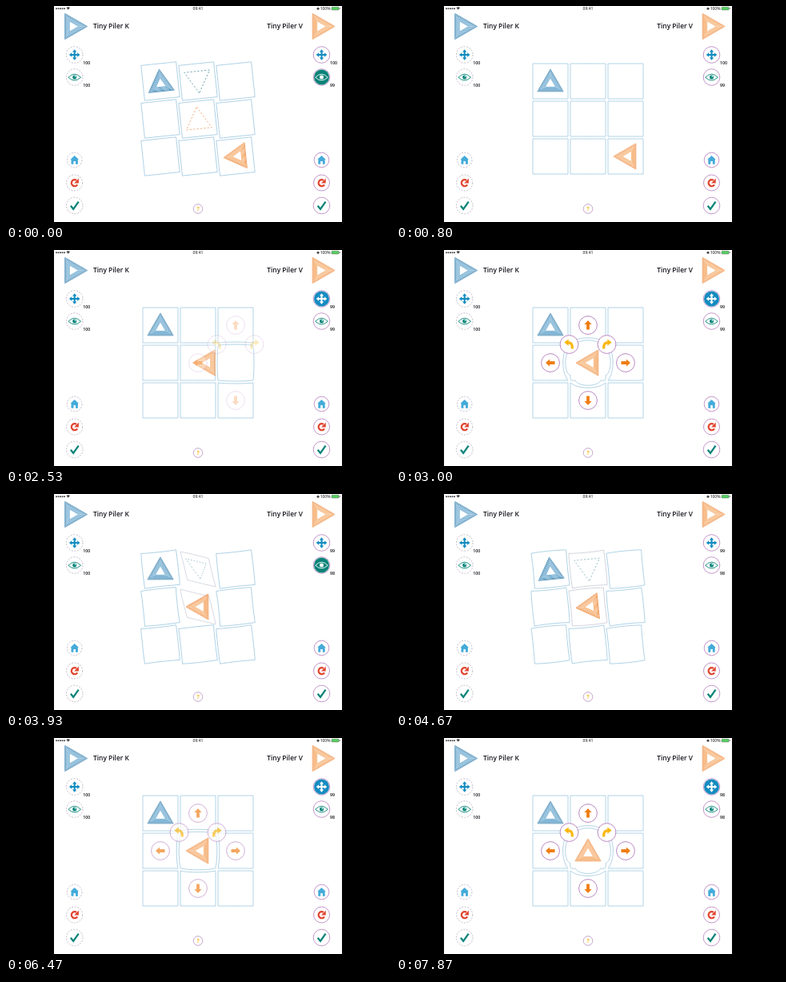
An HTML page for the animation above (8000 ms loop, 480 by 270 pixels).

```html
<!DOCTYPE html>
<html lang="en">
<head>
<meta charset="utf-8">
<title>Triangle board game</title>
<style>
html, body { margin: 0; width: 100%; height: 100%; overflow: hidden; background: #000; }
svg { display: block; width: 480px; height: 270px; }
text { font-family: "Open Sans", sans-serif; fill: #15151c; }
.name { font-size: 8.4px; font-weight: 600; }
.count { font-size: 5.3px; font-weight: 600; }
.bar { font-size: 5px; font-weight: 600; fill: #444; }
.hint { font-size: 7.5px; font-weight: 700; fill: #f5b51c; }
</style>
</head>
<body>
<svg id="stage" viewBox="0 0 480 270">
  <defs>
    <g id="move">
      <path d="M0-4V4M-4 0H4" stroke="currentColor" stroke-width="2.1"/>
      <path d="M0-6.8L2.7-3.4H-2.7ZM0 6.8L2.7 3.4H-2.7ZM-6.8 0L-3.4-2.7V2.7ZM6.8 0L3.4-2.7V2.7Z" fill="currentColor"/>
    </g>
    <g id="eye">
      <path d="M-7.8 .3Q0-8 7.8 .3Q0 7.5-7.8 .3Z" fill="none" stroke="currentColor" stroke-width=".9"/>
      <circle r="2.5" fill="currentColor"/>
      <circle cx=".9" cy="-.9" r=".9" fill="#dff"/>
    </g>
    <path id="home" d="M0-5.6L5.2-.8H4.2V5.2H1.3V1.4H-1.3V5.2H-4.2V-.8H-5.2Z" fill="#45abd9"/>
    <g id="undo">
      <path d="M2.4-3.2A4 4 0 1 0 3.5 2.4" fill="none" stroke="#e0452f" stroke-width="2.3"/>
      <path d="M5.2-5.4V.4H-.4Z" fill="#e0452f"/>
    </g>
    <path id="check" d="M-4.8 .3L-1.5 4.4L5-4.8" fill="none" stroke="#078378" stroke-width="2.3"/>
    <path id="arrow" d="M0-6L4.6-1H1.9V5.5H-1.9V-1H-4.6Z" fill="#f07d14"/>
    <g id="turn">
      <path d="M-3.6 5.6C-4.4 0-2.4-2.3 1.6-2.4" fill="none" stroke="#fbb60c" stroke-width="3.2"/>
      <path d="M.8-6.6L6.2-2.4L.8 1.8Z" fill="#fbb60c"/>
    </g>
  </defs>
  <rect width="480" height="270" fill="#000"/>
  <rect x="60" width="360" height="270" fill="#fff"/>
  <g fill="#444">
    <path d="M63 3.2H74" stroke="#444" stroke-width="2" stroke-linecap="round" stroke-dasharray="0 2.5"/>
    <path d="M75.4 2.1Q77.7 .2 80 2.1L77.7 4.8Z"/>
    <circle cx="390" cy="3.2" r="1.5"/>
    <rect x="407" y="1.2" width="9" height="3.8" rx=".6" fill="#55cf62" stroke="#555" stroke-width=".4"/>
    <rect x="416.6" y="2.2" width=".9" height="1.8"/>
  </g>
  <text class="bar" x="240" y="5" text-anchor="middle">09:41</text>
  <text class="bar" x="405.5" y="5" text-anchor="end">100%</text>
  <text class="name" x="109" y="28.3">Tiny Piler K</text>
  <text class="name" x="371" y="28.3" text-anchor="end">Tiny Piler V</text>
  <circle cx="240" cy="253.5" r="5.8" fill="#fff" stroke="#b98fc0" stroke-width=".8"/>
  <text class="hint" x="240" y="256.3" text-anchor="middle">?</text>
</svg>
<script>
const LOOP = 8000, PITCH = 47, PURPLE = '#b47cbb', SKY = '#a9cfe4';
const BLUE = ['#3f86b3', '#5a9fc9'], ORANGE = ['#f0924a', '#f5a763'];
const DIRS = [[0, -1], [1, 0], [0, 1], [-1, 0]];
const stage = document.getElementById('stage');

const clamp = v => Math.max(0, Math.min(1, v));
const ramp = (t, from, to) => clamp((t - from) / (to - from));
const smooth = u => (1 - Math.cos(Math.PI * u)) / 2;
const within = (t, spans) => spans.some(([a, b]) => t >= a && t < b);
const center = (c, r) => [193 + PITCH * c, 94 + PITCH * r];

function set(el, attrs) {
  for (const k in attrs) el.setAttribute(k, attrs[k]);
  return el;
}
function add(parent, tag, attrs = {}) {
  return parent.appendChild(set(document.createElementNS('http://www.w3.org/2000/svg', tag), attrs));
}
const at = (x, y, rest = '') => ({ transform: `translate(${x} ${y}) ${rest}` });

// Nested triangles pointing up
function piece(parent, [dark, light]) {
  const g = add(parent, 'g', { fill: 'none' });
  for (let i = 0; i < 6; i++) {
    const k = 1 - i * .115;
    const y = v => 3.3 + (v - 3.3) * k;
    add(g, 'path', {
      d: `M0 ${y(-15)}L${16 * k} ${y(12.8)}H${-16 * k}Z`,
      stroke: i < 2 ? dark : light, 'stroke-width': .8
    });
  }
  return g;
}

function button(x, y, icon, color, r, dashed) {
  const g = add(stage, 'g', at(x, y));
  add(g, 'circle', {
    r, fill: '#fff', stroke: dashed ? '#b5a9bd' : PURPLE,
    'stroke-width': .8, 'stroke-dasharray': dashed ? '2 1.6' : 'none'
  });
  const disc = add(g, 'circle', { r: r - .8, fill: color, opacity: 0 });
  const mark = add(g, 'use', { href: '#' + icon, color });
  return on => {
    set(disc, { opacity: on ? 1 : 0 });
    set(mark, { color: on ? '#fff' : color });
  };
}
function counter(x, y) {
  const el = add(stage, 'text', { x, y, class: 'count' });
  el.textContent = '100';
  return el;
}

function panel(x, dashed) {
  const move = button(x, 61, 'move', '#148cc0', 10.3, dashed);
  const eye = button(x, 89, 'eye', '#078378', 10.3, dashed);
  button(x, 192.5, 'home', '#45abd9', 9.3, dashed);
  button(x, 221, 'undo', '#e0452f', 10, dashed);
  button(x, 249.5, 'check', '#078378', 10.3, dashed);
  return { move, eye, moves: counter(x + 10.5, 73), looks: counter(x + 10.5, 101) };
}
panel(85.7, true);
const right = panel(394.5, false);

set(piece(stage, BLUE), at(86.5, 25.5, 'rotate(90)'));
set(piece(stage, ORANGE), at(396, 25.5, 'rotate(90)'));

const cells = [];
for (let r = 0; r < 3; r++) for (let c = 0; c < 3; c++) {
  const g = add(stage, 'g');
  cells.push({ c, r, g, path: add(g, 'path', { fill: 'none', stroke: SKY, 'stroke-width': .9 }) });
}
function hide(cell, color) {
  cell.back = add(cell.g, 'path', {
    d: 'M0-15L16 12.5H-16Z', fill: 'none', stroke: color,
    'stroke-width': .75, 'stroke-dasharray': '2.2 2.2'
  });
}
hide(cells[1], '#4d8f9c');
hide(cells[4], '#f09a5c');

const blue = piece(stage, BLUE), orange = piece(stage, ORANGE);

// Column, row, opening time, closing time
const menus = [
  [2, 2, 1130, 1500], [2, 1, 1700, 2230], [1, 1, 2600, 3470],
  [1, 1, 5270, 6270], [1, 1, 6880, 9000]
].map(([c, r, open, close]) => {
  const [x, y] = center(c, r);
  const g = add(stage, 'g');
  const items = [];
  const put = (dx, dy, icon, rest) => {
    const b = add(g, 'g');
    add(b, 'circle', { r: 11.4, fill: '#fff', stroke: PURPLE, 'stroke-width': .9 });
    add(b, 'use', { href: '#' + icon, transform: rest });
    items.push([b, x + dx, y + dy]);
  };
  DIRS.forEach(([dx, dy], i) => {
    if (cells.some(k => k.c === c + dx && k.r === r + dy))
      put(dx * PITCH, dy * PITCH, 'arrow', `rotate(${i * 90})`);
  });
  put(-23.5, -23, 'turn', 'scale(-1 1)');
  put(23.5, -23, 'turn', '');
  return { c, r, open, close, g, items };
});

// Tilt of the board, later tilt of the contents, card flip, ripple of the sides
function eyeState(t) {
  if (t < 270) return { tilt: 1, late: 1, flip: 1, wave: 0 };
  if (t >= 3600 && t < 4600) {
    const x = t - 3600;
    return {
      tilt: 1 - Math.exp(-x / 110) * Math.cos(x / 90),
      late: smooth(ramp(x, 280, 700)),
      flip: smooth(clamp(x / 520)),
      wave: 3 * Math.exp(-x / 220) * Math.sin(x / 80)
    };
  }
  const start = t < 3600 ? 270 : 4600;
  const u = ramp(t, start, start + 530), left = 1 - smooth(u);
  return { tilt: left, late: left, flip: left, wave: 2 * Math.sin(u * 9) * (1 - u) * Math.min(1, u * 4) };
}

function bulgeAt(m, t) {
  if (t < m.open) return 0;
  const grow = 1 - Math.exp((m.open - t) / 110);
  return 6.4 * grow * (t > m.close ? Math.exp((m.close - t) / 160) : 1);
}

// Square whose four sides bow outwards by the given amounts
function cellPath(bows) {
  const [t, r, b, l] = bows.map(v => 22 + v * 4 / 3);
  const k = Math.max(0, Math.min(...bows)), e = 22 - k, q = 22 + k * .3;
  return `M${-e}-22C-12 ${-t} 12 ${-t} ${e}-22Q${q} ${-q} 22 ${-e}` +
    `C${r}-12 ${r} 12 22 ${e}Q${q} ${q} ${e} 22` +
    `C12 ${b}-12 ${b} ${-e} 22Q${-q} ${q}-22 ${e}` +
    `C${-l} 12 ${-l}-12-22 ${-e}Q${-q} ${-q} ${-e}-22Z`;
}

function draw(t) {
  const eye = eyeState(t), tilt = -6 * eye.tilt, late = -6 * eye.late;

  const bows = cells.map((_, i) => DIRS.map((_, d) => eye.wave * (d % 2 ? -.6 : 1) * (i % 2 ? -1 : 1)));
  for (const m of menus) {
    const b = bulgeAt(m, t);
    if (b) DIRS.forEach(([dx, dy], d) => {
      const c = m.c + dx, r = m.r + dy;
      bows[m.r * 3 + m.c][d] += b;
      if (c >= 0 && c < 3 && r >= 0 && r < 3) bows[r * 3 + c][(d + 2) % 4] -= b;
    });
    const k = ramp(t, m.open + 60, m.open + 280);
    const fade = clamp((t - m.close) / 350);
    set(m.g, { opacity: Math.min(1, k * 1.2) * (1 - fade * fade) });
    m.items.forEach(([el, x, y]) => set(el, at(x, y, `scale(${k})`)));
  }

  const turning = eye.flip > .01 && eye.flip < .99;
  cells.forEach((cell, i) => {
    let spin = `rotate(${tilt})`;
    if (cell.back) {
      const s = Math.abs(Math.cos(Math.PI * eye.flip));
      spin = `rotate(${late}) rotate(45) scale(1 ${s}) rotate(-45)`;
      set(cell.path, { stroke: turning ? '#ced1da' : SKY });
      set(cell.back, { opacity: eye.flip > .5 ? (turning ? .7 : 1) : 0 });
    }
    set(cell.path, { d: cellPath(bows[i]) });
    set(cell.g, at(...center(cell.c, cell.r), spin));
  });
  set(cells[1].back, { transform: 'rotate(180)' });
  set(cells[4].back, { transform: `rotate(${t < 1000 ? 0 : -90})` });

  const row = 2 - smooth(ramp(t, 1560, 1840));
  const col = 2 - smooth(ramp(t, 2300, 2620));
  const turn = -90 + 90 * smooth(ramp(t, 6560, 6900));
  set(blue, at(...center(0, 0), `rotate(${late})`));
  set(orange, at(...center(col, row), `rotate(${turn + late})`));

  right.move(within(t, [[1070, 3470], [5270, LOOP]]));
  right.eye(within(t, [[0, 270], [3470, 4600]]));
  right.moves.textContent = t < 1600 ? 100 : t < 6600 ? 99 : 98;
  right.looks.textContent = t < 3600 ? 99 : 98;
}

const begin = performance.now();
function tick() {
  draw((performance.now() - begin) % LOOP);
  requestAnimationFrame(tick);
}
tick();
</script>
</body>
</html>
```
